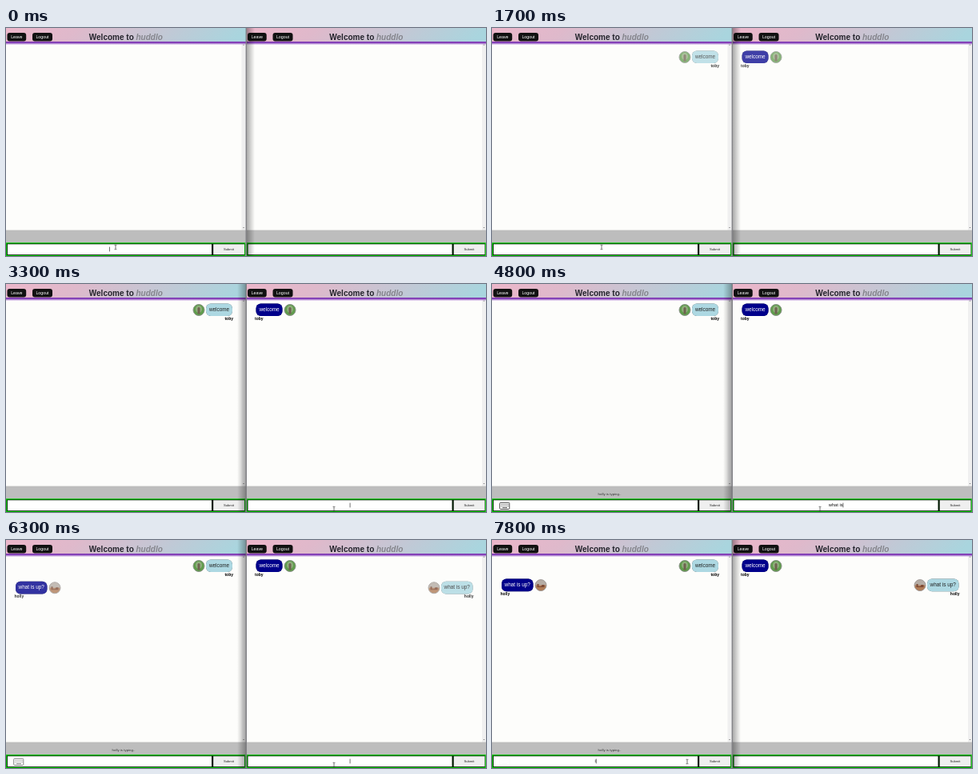
An HTML page for the animation above (8 s loop, 600 by 285 pixels).

```html
<!DOCTYPE html>
<html lang="en">
<head>
<meta charset="utf-8">
<title>Chat room</title>
<style>
  html, body { margin: 0; width: 100%; height: 100%; overflow: hidden; background: #fdfdfb; }
  svg { display: block; width: 100%; height: 100%; font-family: "Liberation Sans", Arial, sans-serif; }
  .title { font: bold 10px "Liberation Sans", Arial, sans-serif; fill: #23232b; }
  .brand { font-style: italic; fill: #85858c; }
  .nav { font-size: 5.3px; fill: #fff; text-anchor: middle; }
  .bubble { filter: drop-shadow(.5px .8px .5px #555); }
  .name { font-size: 5px; font-weight: bold; }
  .middle { text-anchor: middle; }
</style>
</head>
<body>
<svg id="stage" viewBox="0 0 600 285">
  <defs>
    <linearGradient id="bar" x2="1" y2=".06">
      <stop stop-color="#ecb6ca"/><stop offset=".3" stop-color="#dfb9cb"/><stop offset="1" stop-color="#a9d5de"/>
    </linearGradient>
    <linearGradient id="glow" x2="0" y2="1">
      <stop stop-color="#7a2fb0"/><stop offset=".4" stop-color="#8d4fbd"/><stop offset="1" stop-color="#c9a4e6" stop-opacity="0"/>
    </linearGradient>
    <linearGradient id="shade">
      <stop stop-color="#000" stop-opacity=".32"/><stop offset="1" stop-color="#000" stop-opacity="0"/>
    </linearGradient>
    <g id="toby">
      <circle r="7" fill="#5f9d4b"/>
      <ellipse cy="-1" rx="4" ry="4.5" fill="#8fae7c"/>
      <path d="M-1.5 5V-2a1.5 1.5 0 0 1 3 0V5z" fill="#6f6250"/>
      <circle r="7" fill="none" stroke="#8c938a"/>
    </g>
    <g id="holly">
      <circle r="7" fill="#b5aca4"/>
      <path d="M-7 0H7A7 7 0 0 1-7 0z" fill="#b07d58"/>
      <path d="M-4.5 2.5v-4h2v3h3l1-2h3v3z" fill="#7c4a35"/>
      <circle r="7" fill="none" stroke="#a09a96"/>
    </g>
    <g id="keyboard" fill="none" stroke="#444">
      <rect x="9.7" y="273.3" width="12.1" height="8.2" rx="1"/>
      <path d="M11.5 275.5h9M11.5 277.5h9" stroke-dasharray="1 1"/>
      <path d="M13 279.6h6"/>
    </g>
  </defs>
</svg>
<script>
const LOOP = 8000, STEP = 100;
const stage = document.getElementById('stage');

const clamp = v => Math.max(0, Math.min(1, v));
const ramp = (t, from, to) => clamp((t - from) / (to - from));
const ease = p => p * p * (3 - 2 * p);
const between = (t, from, to) => t >= from && t < to;

function message(id, mine, text, name, y, width) {
  const left = mine ? 283 - width : 12;
  const avatarX = mine ? left - 9 : left + width + 9.5;
  return `<g class="${id}">
    <use href="#${name}" x="${avatarX}" y="${y}"/>
    <rect class="bubble" x="${left}" y="${y - 8}" width="${width}" height="15.6" rx="6" fill="${mine ? '#add8e2' : '#00008b'}"/>
    <text class="middle" x="${left + width / 2}" y="${y + 1.7}" font-size="6.4" fill="${mine ? '#222' : '#fff'}">${text}</text>
    <text class="name" x="${mine ? 284 : 10.5}" y="${y + 12.6}" text-anchor="${mine ? 'end' : 'start'}">${name}</text>
  </g>`;
}

function navButton(x, width, label) {
  return `<rect x="${x}" y="6" width="${width}" height="10.4" rx="3" fill="#111"/>
    <text class="nav" x="${x + width / 2}" y="13.1">${label}</text>`;
}

function addPanel(dx, isLeft) {
  const panel = document.createElementNS('http://www.w3.org/2000/svg', 'g');
  panel.setAttribute('transform', `translate(${dx} 0)`);
  panel.innerHTML = `
    <rect width="300" height="285" fill="#fdfdfb"/>
    <rect x="294.5" y="18" width="5" height="235" fill="#f0f0f0"/>
    <path d="M296 21.5l1-1.3 1 1.3zM296 249l1 1.3 1-1.3z" fill="#777"/>
    <rect width="300" height="17.2" fill="url(#bar)"/>
    <rect y="17" width="300" height="4.5" fill="url(#glow)"/>
    ${navButton(1.5, 23.7, 'Leave')}${navButton(33, 25, 'Logout')}
    <text class="title" x="103.8" y="14.5">Welcome to <tspan class="brand">huddlo</tspan></text>
    ${message('first', isLeft, 'welcome', 'toby', 32.5, 33)}
    ${message('second', !isLeft, 'what is up?', 'holly', 56.6, 39.5)}
    <rect y="252.6" width="300" height="33" fill="#bdbdbd"/>
    <text class="status middle" x="147" y="264.3" font-size="4.4" fill="#333">${isLeft ? 'holly' : 'toby'} is typing..</text>
    <rect y="268.3" width="299.3" height="16.7" fill="#00c800"/>
    <rect x="1.2" y="269.5" width="297" height="14.5" fill="#001800"/>
    <rect x="2" y="270.3" width="255" height="12.9" fill="#fff"/>
    <rect x="259.2" y="270.3" width="38.8" height="12.9" fill="#efefef"/>
    <text class="middle" x="278.4" y="278" font-size="4.2" fill="#222">Submit</text>
    <g class="hover">
      <rect x="259" y="269.3" width="39.5" height="14.7" fill="#555" stroke="#00c800" stroke-dasharray="2 1"/>
      <text class="middle" x="278.4" y="278" font-size="4.2" fill="#666">Submit</text>
    </g>
    <use class="keys" href="#keyboard"/>
    <text class="draft middle" x="129.2" y="278.4" font-size="5.7" fill="#111"></text>
    <rect class="caret" y="273.6" width=".7" height="5.8" fill="#333"/>`;
  stage.append(panel);
  return Object.fromEntries(['first', 'second', 'status', 'hover', 'keys', 'draft', 'caret']
    .map(name => [name, panel.querySelector('.' + name)]));
}

const left = addPanel(0, true);
const right = addPanel(300.5, false);
stage.insertAdjacentHTML('beforeend', `
  <rect id="shadeRight" x="301" width="10" height="285" fill="url(#shade)"/>
  <rect id="shadeLeft" width="11" height="285" fill="url(#shade)" transform="matrix(-1 0 0 1 300 0)"/>
  <rect x="299.6" width="1.3" height="285" fill="#77777c"/>
  <path id="pointer" d="M-1.4-2.7H-.4L0-2.3.4-2.7H1.4M0-2.3V2.3M-1.4 2.7H-.4L0 2.3.4 2.7H1.4" fill="none" stroke="#333" stroke-width=".7"/>`);
const shadeRight = document.getElementById('shadeRight');
const shadeLeft = document.getElementById('shadeLeft');
const pointer = document.getElementById('pointer');

const show = (el, opacity) => el.setAttribute('opacity', +opacity);

function rise(el, p) {
  show(el, p);
  el.setAttribute('transform', `translate(0 ${16 * (1 - p)})`);
}

function setDraft(panel, text, caretOn) {
  panel.draft.textContent = text;
  const half = text ? panel.draft.getComputedTextLength() / 2 : 0;
  panel.caret.setAttribute('x', 129.2 + half);
  show(panel.caret, caretOn);
}

const typed = (text, t, start, pace) => text.slice(0, Math.max(0, Math.floor((t - start) / pace) + 1));
const blink = (t, since) => (t - since) % 1000 < 500;
const pulse = (t, start) => .5 - .5 * Math.cos((t - start) / 1000 * Math.PI);

function leftDraft(t) {
  if (t < 1100) return [typed('welcome', t, 200, 110), true];
  if (t < 3000) return ['', blink(t, 1100)];
  return [t >= 7800 ? 'i' : '', t >= 7300];
}

function rightDraft(t) {
  if (t < 3300 || t >= 7300) return ['', false];
  if (t < 5900) return [typed('what is up?', t, 3950, 135), t < 5800];
  return ['', blink(t, 5900)];
}

function render(t) {
  // The first message stalls part-way before it settles.
  rise(left.first, t < 1200 ? 0 : t < 1700 ? .25 : .75 + .25 * ramp(t, 1700, 2000));
  rise(right.first, +left.first.getAttribute('opacity'));
  const second = t < 6000 ? 0 : .5 + .5 * ramp(t, 6000, 6500);
  rise(left.second, second);
  rise(right.second, second);

  const tobyTypes = between(t, 300, 1100);
  const hollyTypes = t >= 4000;
  show(right.status, tobyTypes);
  show(left.status, hollyTypes);
  show(right.keys, tobyTypes ? pulse(t, 200) : 0);
  show(left.keys, hollyTypes ? pulse(t, 3700) : 0);

  setDraft(left, ...leftDraft(t));
  setDraft(right, ...rightDraft(t));

  const leftActive = t < 3000 || t >= 7300;
  show(shadeRight, leftActive);
  show(shadeLeft, !leftActive);

  const away = ease(ramp(t, 1900, 2500)) - ease(ramp(t, 6300, 6900)) * 166 / 273;
  const y = t < 6300 ? 274 + 7 * away : 281 - 4 * ease(ramp(t, 6300, 6900));
  pointer.setAttribute('transform', `translate(${137 + 273 * away} ${y})`);
  show(left.hover, ramp(t, 6600, 6800) * (1 - ramp(t, 6900, 7200)));
  show(right.hover, 0);
}

function frame(now) {
  const t = Math.floor(now % LOOP / STEP) * STEP;
  render(Math.min(t, 7800));
  requestAnimationFrame(frame);
}
requestAnimationFrame(frame);
</script>
</body>
</html>
```
